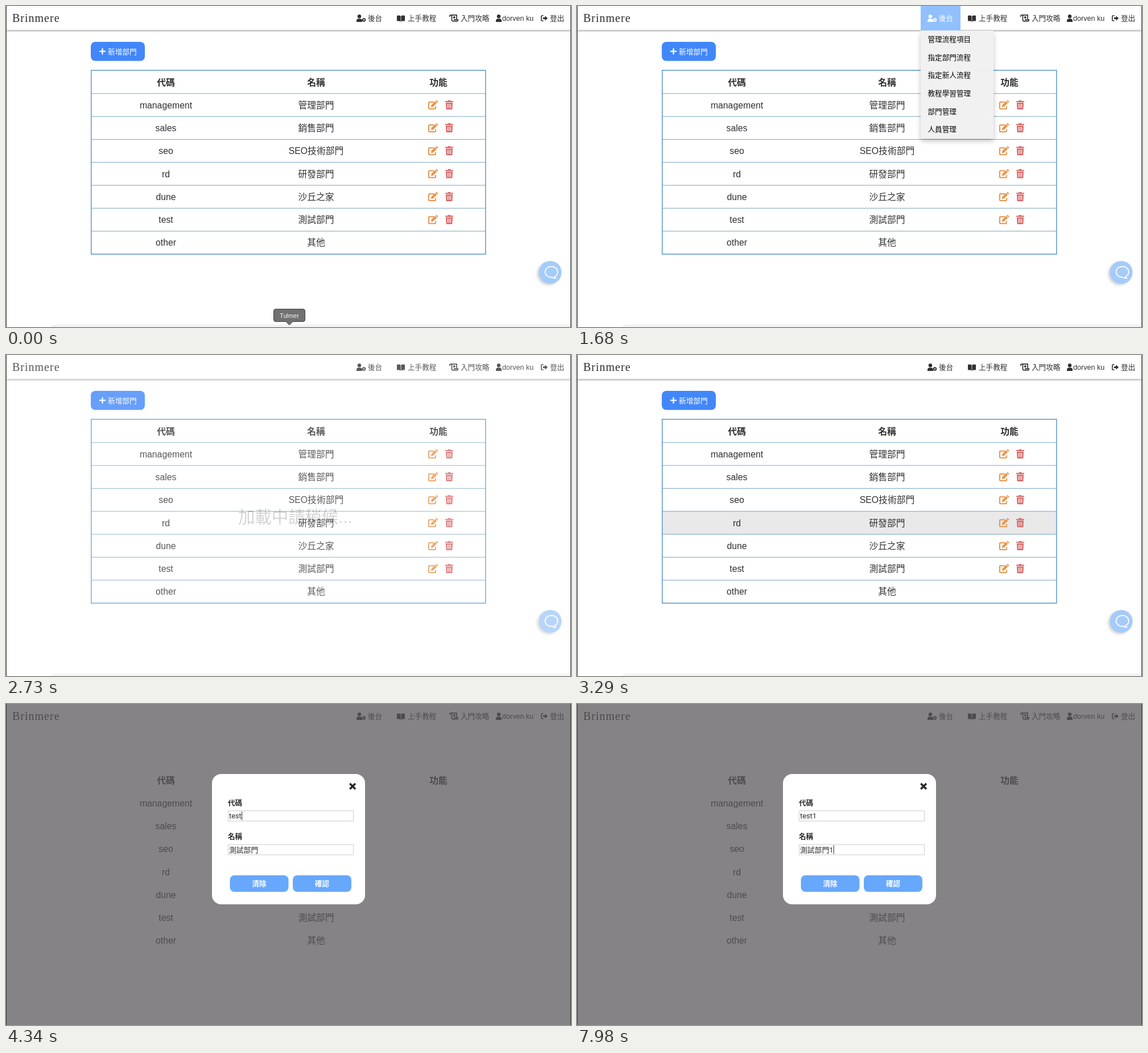
Animation, 993 px wide and 564 px high, one loop 8000 ms. Source, as an HTML page:

```html
<!DOCTYPE html>
<html lang="zh-Hant">
<head>
<meta charset="utf-8">
<style>
  html, body { margin: 0; width: 100%; height: 100%; overflow: hidden; background: #fff; }
  svg { display: block; width: 993px; height: 564px; }
  text { font-family: 'Liberation Sans', 'Noto Sans CJK TC', 'Noto Sans CJK', sans-serif; white-space: pre; }
  .brand { font-family: 'Liberation Serif', serif; letter-spacing: 1px; }
  .field { font-family: Roboto, 'Noto Sans CJK TC', 'Noto Sans CJK', sans-serif; }
</style>
</head>
<body>
<svg id="stage" viewBox="0 0 993 564">
  <defs>
    <filter id="soft" x="-30%" y="-30%" width="160%" height="160%"><feGaussianBlur stdDeviation="2"/></filter>
    <filter id="wide" x="-30%" y="-30%" width="160%" height="160%"><feGaussianBlur stdDeviation="5"/></filter>
  </defs>
</svg>
<script>
const LOOP = 8000;
const ROW = 40.3, FIRST_ROW = 174;
const departments = [
  ['management', '管理部門'], ['sales', '銷售部門'], ['seo', 'SEO技術部門'],
  ['rd', '研發部門'], ['dune', '沙丘之家'], ['test', '測試部門'], ['other', '其他']
];
const menuItems = ['管理流程項目', '指定部門流程', '指定新人流程', '教程學習管理', '部門管理', '人員管理'];

// Text is placed by its vertical centre.
const text = (x, cy, s, size = 12.6, attrs = '') =>
  `<text x="${x}" y="${cy + size * .36}" font-size="${size}" ${attrs}>${s}</text>`;
const rect = (x, y, w, h, fill, attrs = '') =>
  `<rect x="${x}" y="${y}" width="${w}" height="${h}" fill="${fill}" ${attrs}/>`;
const at = (x, y, body, attrs = '') => `<g transform="translate(${x} ${y})" ${attrs}>${body}</g>`;
const group = (id, body, attrs = '') => `<g id="${id}" ${attrs}>${body}</g>`;
const mid = 'text-anchor="middle"';
const bold = 'font-weight="700"';

const person = '<circle cx="5" cy="3.3" r="3.2"/><path d="M0 13v-2c0-2.5 1.5-3.8 3.5-3.8h3c2 0 3.5 1.3 3.5 3.8v2z"/>';
const icons = {
  person,
  admin: person + '<circle cx="13" cy="9.5" r="2.2" fill="none" stroke="currentColor" stroke-width="1.9"/>',
  book: '<path d="M0 1Q4 0 6.6 1.6V11.5Q4 10 0 10.4zM14 1Q10 0 7.4 1.6V11.5Q10 10 14 10.4z"/>',
  guide: `<path d="M0 4V2Q0 .8 1.7 .8H12V8M3.5 1V9.5Q3.5 11.6 6 11.6H13.5Q14.5 11.4 14.3 9.2H7"
    fill="none" stroke="currentColor" stroke-width="1.7"/><circle cx="7.8" cy="5" r="1.9"/>`,
  exit: `<path d="M4.5 1H2Q.8 1 .8 2.3V8.7Q.8 10 2 10H4.5" fill="none" stroke="currentColor" stroke-width="1.6"/>
    <path d="M3.8 4H7.3V1.2L12 5.5 7.3 9.8V7H3.8z"/>`,
  edit: `<path d="M10 3H2.2Q1 3 1 4.2V13.8Q1 15 2.2 15H11.8Q13 15 13 13.8V10.5" fill="none" stroke="#e6954c" stroke-width="2"/>
    <path d="M5 12l.5-3.7 6.7-6.7 3.1 3.1-6.7 6.7zM13 .9l.8-.7q.8-.6 1.6.1l1.6 1.6q.7.8 0 1.5l-.9.8z" fill="#e6954c"/>`,
  trash: `<path fill="#d66464" fill-rule="evenodd" d="M0 1.3H4.3L5 0H9L9.7 1.3H14V3.2H0z
    M1 4.2H13L12.4 15Q12.3 16 11.3 16H2.7Q1.7 16 1.6 15z
    M3.8 6.2V13.8H5V6.2zM6.4 6.2V13.8H7.6V6.2zM9 6.2V13.8H10.2V6.2z"/>`
};

const rowY = i => FIRST_ROW + ROW * i;
const divider = (_, i) => `<path d="M150 ${rowY(i) - 20.2}H842" stroke="#78a5c3"/>`;
const rowIcons = (_, i) => at(742, rowY(i) - 8.3, icons.edit) + at(772, rowY(i) - 8.3, icons.trash);
const rowText = ([code, name], i) => text(281, rowY(i), code, 15.8, mid) + text(545, rowY(i), name, 15.8, mid);
const heading = (x, s) => text(x, 134.3, s, 15.8, mid + bold);
const navItem = (x, y, icon, textX, label) => at(x, y, icons[icon]) + text(textX, 21.5, label);
const adminItem = navItem(616, 15, 'admin', 636, '後台');

const scenery =
  rect(0, 38, 993, 6, '#000', 'opacity=".32" filter="url(#soft)"') + rect(0, 0, 993, 42, '#fff') +
  '<path d="M78 564Q82 559.5 90 559.5H993V564z" fill="#f3f3f3"/>' +
  rect(149, 63, 95, 33.5, '#4287fa', 'rx="8"') +
  '<path d="M164 79.7H175M169.5 74.2V85.2" stroke="#fff" stroke-width="2.2"/>' +
  text(179, 80, '新增部門', 12.7, 'fill="#fff" font-weight="500"') +
  rect(150, 0, 692, ROW, '#e9e9e9', 'id="hover"') +
  departments.map(divider).join('') +
  rect(149.8, 113, 693, 323, 'none', 'stroke="#6ba2d2" stroke-width="1.7"') +
  departments.slice(0, 6).map(rowIcons).join('') +
  '<circle cx="953.5" cy="470.5" r="20" fill="#bbb" opacity=".65" filter="url(#soft)"/>' +
  '<circle cx="956.5" cy="468" r="20" fill="#a5cbfb"/>' +
  '<path d="M964 475.5A11 9.5 0 1 0 959.5 476.7Q963 478.5 966.5 478Q964.3 477 964 475.5z" fill="none" stroke="#fff" stroke-width="1.8" stroke-linejoin="round"/>';

const lettering =
  text(11, 21, 'Brinmere', 20, 'class="brand"') + adminItem +
  navItem(687, 16, 'book', 706, '上手教程') + navItem(780, 15, 'guide', 799, '入門攻略') +
  navItem(861, 15, 'person', 872, 'dorven ku') + navItem(940, 16, 'exit', 956, '登出') +
  heading(281, '代碼') + heading(545, '名稱') + heading(760, '功能') +
  departments.map(rowText).join('');

const dropdown =
  rect(604, 49, 128, 188, '#000', 'opacity=".25" filter="url(#wide)"') +
  rect(604, 43, 128, 190, '#f1f1f1') + rect(604, 0, 70, 43, '#90c0fd') +
  `<g fill="#fff" color="#fff">${adminItem}</g>` +
  menuItems.map((s, i) => text(616.5, 58.7 + 31.6 * i, s, 12.6, 'fill="#000"')).join('');

const tooltip =
  '<path d="M474 532.5H522Q525.5 532.5 525.5 536V551Q525.5 554.5 522 554.5H504L498 560.5 492 554.5H474Q470.5 554.5 470.5 551V536Q470.5 532.5 474 532.5z" fill="#717171" stroke="#3e3e3e"/>' +
  text(498, 543.8, 'Tulmer', 11, mid + ' fill="#f4f4f4"');

const loader = rect(0, 0, 993, 564, '#fff', 'opacity=".915"') + text(408, 284, '加載中請稍候...', 29.4, 'fill="#3c3c3c"');
const status = '<path d="M0 550H327Q330.500 550 330.500 553.500V564H0z" fill="#3d3d3d"/>' +
  text(3, 558.5, '等候快取...', 9, 'fill="#ddd"');

const field = (id, label, y) =>
  text(390, y - 23.5, label, 12.6, bold) +
  rect(390.5, y - 9, 220, 18, '#fff', 'stroke="#ccc"') +
  text(392, y, `<tspan></tspan><tspan text-decoration="underline"></tspan>`, 12.8, `id="${id}" class="field"`);
const button = (x, label) => rect(x, 301, 103, 29, '#67a8fc', 'rx="8"') +
  text(x + 51.5, 315.5, label, 12.6, mid + bold + ' fill="#fff"');
const modal =
  rect(362, 123, 269, 229, '#fff', 'rx="16"') +
  '<path d="M604.3 139.800L614 149.500M614 139.800L604.300 149.500" stroke="#262626" stroke-width="3.4"/>' +
  field('code', '代碼', 196.7) + field('name', '名稱', 256) +
  button(393.5, '清除') + button(504, '確認') + rect(0, 0, 1, 15, '#222', 'id="caret"');

const stage = document.getElementById('stage');
stage.innerHTML += rect(0, 0, 993, 564, '#fff') + group('scenery', scenery) +
  group('scrim', rect(0, 0, 993, 564, '#868386')) +
  group('lettering', lettering, 'fill="#303030" color="#303030"') +
  group('dropdown', dropdown) + group('tooltip', tooltip) + group('loader', loader) + group('status', status) +
  group('modal', modal, 'fill="#2b2b2b"') +
  rect(0, 0, 1, 564, '#3a3a3a') + rect(992, 0, 1, 564, '#3a3a3a');

const el = id => document.getElementById(id);
const ramp = (t, from, to) => Math.max(0, Math.min(1, (t - from) / (to - from)));
const pulse = (t, inFrom, inTo, outFrom, outTo) => ramp(t, inFrom, inTo) - ramp(t, outFrom, outTo);
const show = (id, opacity) => {
  el(id).style.opacity = opacity;
  el(id).style.display = opacity > 0 ? '' : 'none';
};
// Latest value whose start time has passed.
const latest = (t, steps) => steps.filter(([start]) => t >= start).pop()[1];

function fill(id, value, composing = '') {
  const [plain, underlined] = el(id).children;
  plain.textContent = value;
  underlined.textContent = composing;
}

function draw(t) {
  show('tooltip', pulse(t, -1, 0, 210, 420));
  show('dropdown', pulse(t, 770, 910, 1680, 1750));
  show('loader', pulse(t, 1800, 2030, 2480, 2800));
  show('status', t >= 2030 && t < 2660 ? 1 : 0);

  const row = latest(t, [[0, -1], [2940, 3], [3430, 4], [3570, 5]]);
  show('hover', row < 0 ? 0 : 1);
  el('hover').setAttribute('y', rowY(row) - ROW / 2);

  const open = ramp(t, 4090, 4320);
  show('scrim', open);
  show('modal', open);
  el('lettering').style.opacity = 1 - .34 * open;

  fill('code', 'test' + (t >= 6860 ? '1' : ''), t >= 6230 && t < 6580 ? 'ㄅ' : '');
  fill('name', '測試部門' + (t >= 7700 ? '1' : ''));

  const focus = t < 7280 ? 'code' : 'name';
  const blinkStart = latest(t, [[0, 4200], [6230, 6230], [6580, 6580], [6860, 6860], [7280, 7280], [7700, 7700]]);
  show('caret', t >= 4200 && (t - blinkStart) % 1000 < 500 ? 1 : 0);
  if (open > 0) {
    el('caret').setAttribute('x', 392.3 + el(focus).getComputedTextLength());
    el('caret').setAttribute('y', focus === 'code' ? 189 : 248.500);
  }
}

const began = performance.now();
function frame() {
  draw((performance.now() - began) % LOOP);
  requestAnimationFrame(frame);
}
frame();
</script>
</body>
</html>
```
